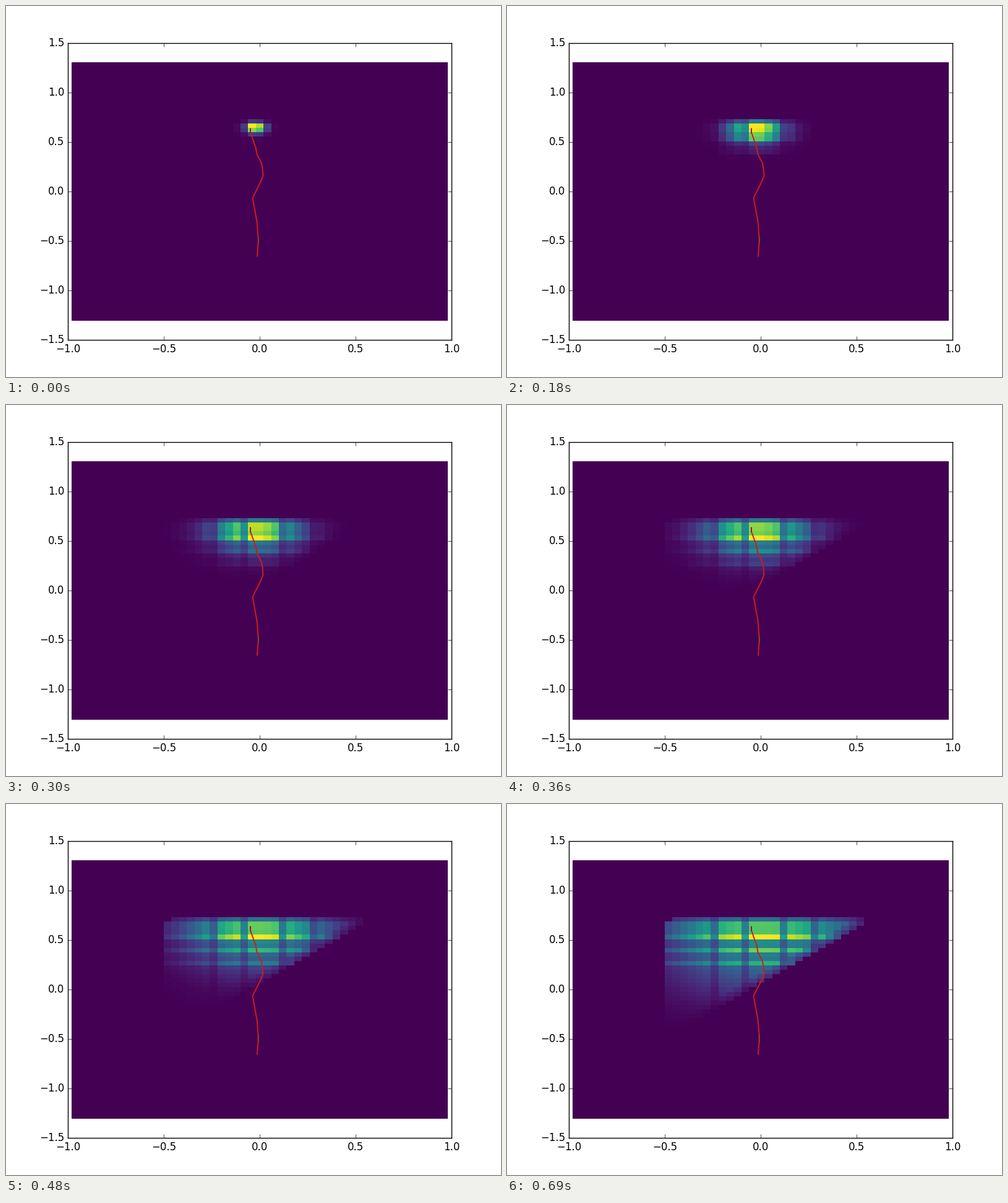
Write a matplotlib script that moves like this. It is 800x600 px and loops after 0.72 s.

```python
import numpy as np
import matplotlib.pyplot as plt
from matplotlib.animation import FuncAnimation
from matplotlib.patches import Rectangle

plt.style.use("classic")
plt.rcParams.update({
    "font.family": "DejaVu Sans",
    "figure.facecolor": "white",
    "savefig.facecolor": "white",
    "savefig.dpi": 100,
})

FRAMES, INTERVAL = 24, 30
COLS, ROWS = 49, 59
HALF_W, HALF_H = 0.98, 1.306
SHIFT_X, SHIFT_Y = -0.00115, -0.0025  # aligns cell edges with the pixel grid

col = np.arange(COLS) - COLS // 2
row = np.arange(ROWS)[:, None]


def static_weights():
    """Banded weights inside a wedge, fading to the sides and downwards."""
    col_fade = np.exp(-(np.abs(col - 0.3) / 13) ** 2.4)
    col_band = np.where(np.isin(col, [-6, -2, 3, 7]), 0.6, 1)
    row_fade = np.exp(-(np.clip(row - 13, 0, None) / 18) ** 3)
    row_band = np.select(
        [row < 14, row < 17, row == 17, np.isin(row, [20, 23])],
        [0.35, 0.72, 1, 0.86], 0.5)

    diagonal = col + row
    soft_edge = np.clip((29 - diagonal) / 4, 0, 1)
    wedge = ((row >= 13) & (col >= -12) & (col <= 13)
             & (diagonal >= 2) & (diagonal <= 27))
    return col_fade * col_band * row_fade * row_band * soft_edge * wedge


weights = static_weights()


def density(i):
    """Gaussian cloud widening over the weights, peak scaled to 1."""
    sigma = 0.87 * np.exp(0.247 * i ** 0.79)
    dist2 = (col + 0.6) ** 2 + (row - 14.35) ** 2
    cloud = weights * np.exp(-dist2 / (2 * sigma ** 2))
    return cloud / cloud.max()


def to_data(points):
    """Pixel positions to axes coordinates, at pixel centres."""
    x, y = np.array(points, float).T + 0.5
    return (x - 410) / 310, (300 - y) / 160


fig = plt.figure(figsize=(8, 6), dpi=100)
ax = fig.add_axes([0.125, 0.1, 0.775, 0.8])
ax.add_patch(Rectangle((-HALF_W, -HALF_H), 2 * HALF_W, 2 * HALF_H, lw=0,
                       color=plt.get_cmap("viridis")(0.0), zorder=-1))
image = ax.imshow(density(0), cmap="viridis", vmin=0, vmax=1,
                  interpolation="nearest", aspect="auto",
                  extent=[-HALF_W + SHIFT_X, HALF_W + SHIFT_X,
                          -HALF_H + SHIFT_Y, HALF_H + SHIFT_Y])

PATH = [(394.5, 198), (394.5, 204), (403, 228), (405, 239), (412, 253),
        (414, 262), (415, 274), (410, 286), (398, 310), (405, 348),
        (407, 373), (407, 383), (405.5, 404)]
for part, color in [(PATH, "#d01c18"), (PATH[:2], "#8a2216"),
                    (PATH[10:12], "#7d4420")]:
    ax.plot(*to_data(part), color=color, lw=1.4)

ax.set_xlim(-1, 1)
ax.set_ylim(-1.5, 1.5)
ax.set_xticks(np.linspace(-1, 1, 5))
ax.set_yticks(np.linspace(-1.5, 1.5, 7))


def update(i):
    image.set_data(density(i))
    return [image]


anim = FuncAnimation(fig, update, frames=FRAMES, interval=INTERVAL,
                     repeat=True, repeat_delay=0)
plt.show()
```
